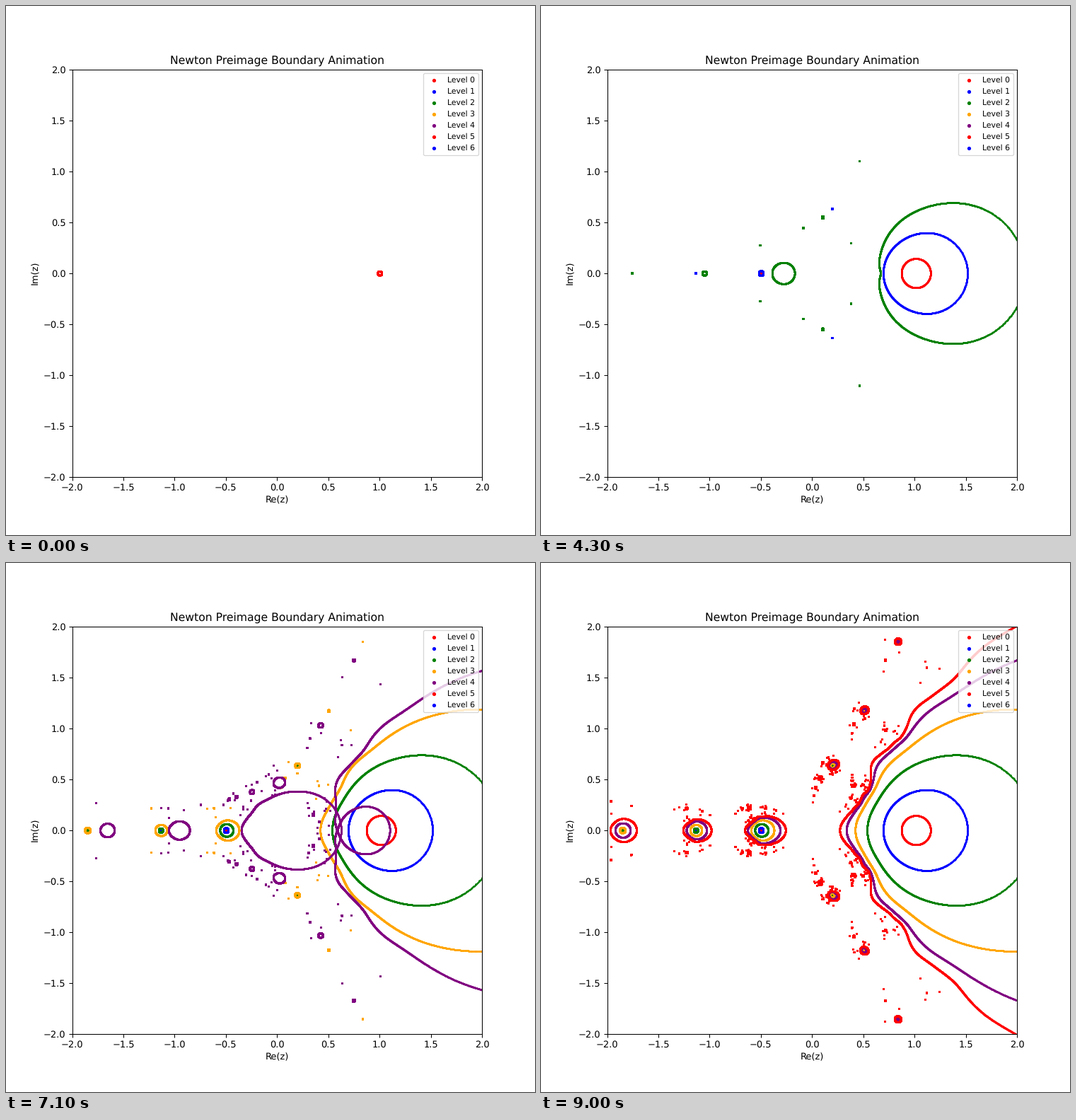
Recreate the animation shown at these times as a matplotlib script. Size 748 by 748 pixels, loop 9.1 s.

```python
import numpy as np
import matplotlib.pyplot as plt
from matplotlib.animation import FuncAnimation

DEPTH = 6
STEPS = 15          # frames per level
RADIUS = 0.02
POINTS = 200
COLORS = ["red", "blue", "green", "orange", "purple"]

plt.rcParams["text.hinting"] = "none"


def preimages(w):
    """All three z with (2z^3 + 1) / (3z^2) = w, one row per root."""
    # u = 1/z solves u^3 - 3wu + 2 = 0 (Cardano)
    d = np.sqrt(1 - w**3 + 0j)
    cube = np.where(np.abs(d - 1) > np.abs(d + 1), d - 1, -1 - d)
    turns = np.exp(2j * np.pi * np.arange(3) / 3)[:, None]
    s = cube ** (1 / 3) * turns
    return 1 / (s + w / s)


def offsets(z):
    z = z[(np.abs(z.real) < 2.1) & (np.abs(z.imag) < 2.1)]
    return np.column_stack([z.real, z.imag])


angles = np.linspace(0, 2 * np.pi, POINTS, endpoint=False)
levels = [1 + RADIUS * np.exp(1j * angles)]
for _ in range(DEPTH):
    levels.append(preimages(levels[-1]).ravel())


def blend(k, t):
    """Level k moving straight towards its preimages."""
    return (1 - t) * np.tile(levels[k], 3) + t * levels[k + 1]


fig, ax = plt.subplots(figsize=(8, 8), dpi=93.5)
ax.set_xlim(-2, 2)
ax.set_ylim(-2, 2)
ax.set_xlabel("Re(z)")
ax.set_ylabel("Im(z)")
ax.set_title("Newton Preimage Boundary Animation")
dots = [
    ax.scatter([], [], s=1, color=COLORS[k % len(COLORS)], label=f"Level {k}")
    for k in range(DEPTH + 1)
]
ax.legend(loc="upper right", fontsize="small", markerscale=3)

EMPTY = np.empty((0, 2))


def update(frame):
    current, step = divmod(frame, STEPS)
    for k, dot in enumerate(dots):
        if k < current:
            dot.set_offsets(offsets(levels[k + 1]))
        elif k == current and k < DEPTH:
            dot.set_offsets(offsets(blend(k, step / STEPS)))
        else:
            dot.set_offsets(EMPTY)
    return dots


anim = FuncAnimation(fig, update, frames=DEPTH * STEPS + 1, interval=100,
                     repeat=True, repeat_delay=0)
plt.show()
```
